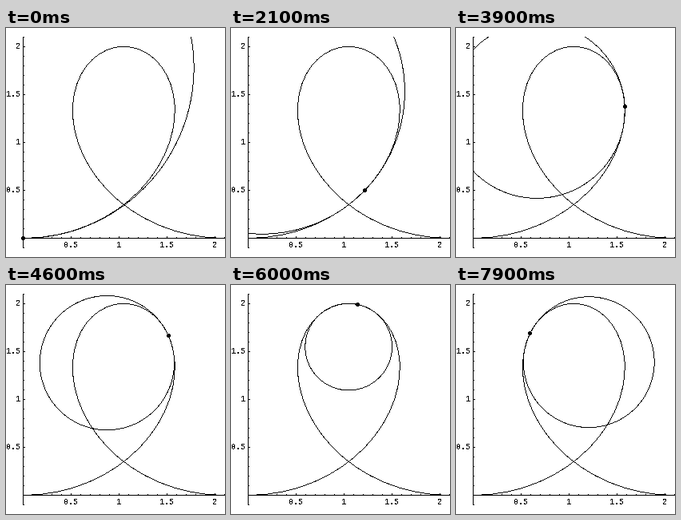
A matplotlib script that plays this animation: 274 px wide and 287 px high, repeating every 8 s.

```python
import numpy as np
import matplotlib.pyplot as plt
from matplotlib.animation import FuncAnimation

W, H, DPI = 274, 287, 100
FRAMES, STEP, INTERVAL = 80, 0.05, 100
X0, Y0, UNIT = 21.5, 263.5, 120.14
LEFT, RIGHT, TOP, BOTTOM = 21, 274, 11, 276
FONT = 10 * 72 / DPI

plt.rcParams["text.antialiased"] = False
plt.rcParams["font.family"] = "Liberation Mono"

ROWS, COLS = np.mgrid[:H, :W]


def to_px(x, y):
    return X0 + UNIT * x, Y0 - UNIT * y


def pixel(x, y):
    px, py = to_px(x, y)
    return int(px), int(py)


def curve(t):
    return t / 3 + np.sin(t), 1 - np.cos(t)


def osculating(t):
    """Centre and radius of the osculating circle at t."""
    x, y = curve(t)
    dx, dy = 1 / 3 + np.cos(t), np.sin(t)
    speed2 = dx * dx + dy * dy
    k = speed2 / (1 + np.cos(t) / 3)
    return x - dy * k, y + dx * k, np.sqrt(speed2) * k


def stroke(ink, x, y):
    """Draw a densely sampled path as a hard line one pixel wide."""
    px, py = to_px(x, y)
    steep = np.abs(np.gradient(py)) > np.abs(np.gradient(px))
    major = np.where(steep, py, px)
    keep = np.abs(major % 1 - 0.5) < 0.06
    keep &= (px >= LEFT) & (px < RIGHT) & (py >= TOP) & (py < BOTTOM)
    ink[py[keep].astype(int), px[keep].astype(int)] = True


def draw_axes(ink):
    x0, y0 = pixel(0, 0)
    ink[TOP:BOTTOM, x0] = True
    ink[y0, LEFT:RIGHT] = True
    for n in range(-1, 22):
        size = 2 if n % 5 == 0 else 1
        x, y = pixel(n / 10, n / 10)
        ink[y, x0:x0 + 1 + size] = True
        if n > 0:
            ink[y0 - size:y0, x] = True


def draw_labels():
    for v in (0.5, 1, 1.5, 2):
        x, y = pixel(v, v)
        ax.text(x, 275, f"{v:g}", size=FONT, ha="center", va="baseline")
        ax.text(18.5, y + 3, f"{v:g}", size=FONT, ha="right", va="baseline")


def draw_curve(ink):
    knots = np.linspace(0, 2 * np.pi, 49)
    t = np.linspace(0, 2 * np.pi, 20001)
    x, y = curve(knots)
    stroke(ink, np.interp(t, knots, x), np.interp(t, knots, y))


fig = plt.figure(figsize=(W / DPI, H / DPI), dpi=DPI, facecolor="white")
ax = fig.add_axes([0, 0, 1, 1])
ax.axis("off")

base = np.zeros((H, W), bool)
draw_axes(base)
draw_curve(base)
image = ax.imshow(base, cmap="binary", vmin=0, vmax=1, interpolation="nearest",
                  extent=(0, W, H, 0), aspect="auto")
draw_labels()

ANGLES = np.linspace(0, 2 * np.pi, 30001)


def update(i):
    t = i * STEP
    ink = base.copy()
    cx, cy, r = osculating(t)
    stroke(ink, cx + r * np.cos(ANGLES), cy + r * np.sin(ANGLES))
    px, py = pixel(*curve(t))
    ink |= np.hypot(COLS - px, ROWS - py) <= 2.5
    image.set_data(ink)
    return image,


anim = FuncAnimation(fig, update, frames=FRAMES, interval=INTERVAL,
                     repeat=True, repeat_delay=0)
plt.show()
```
